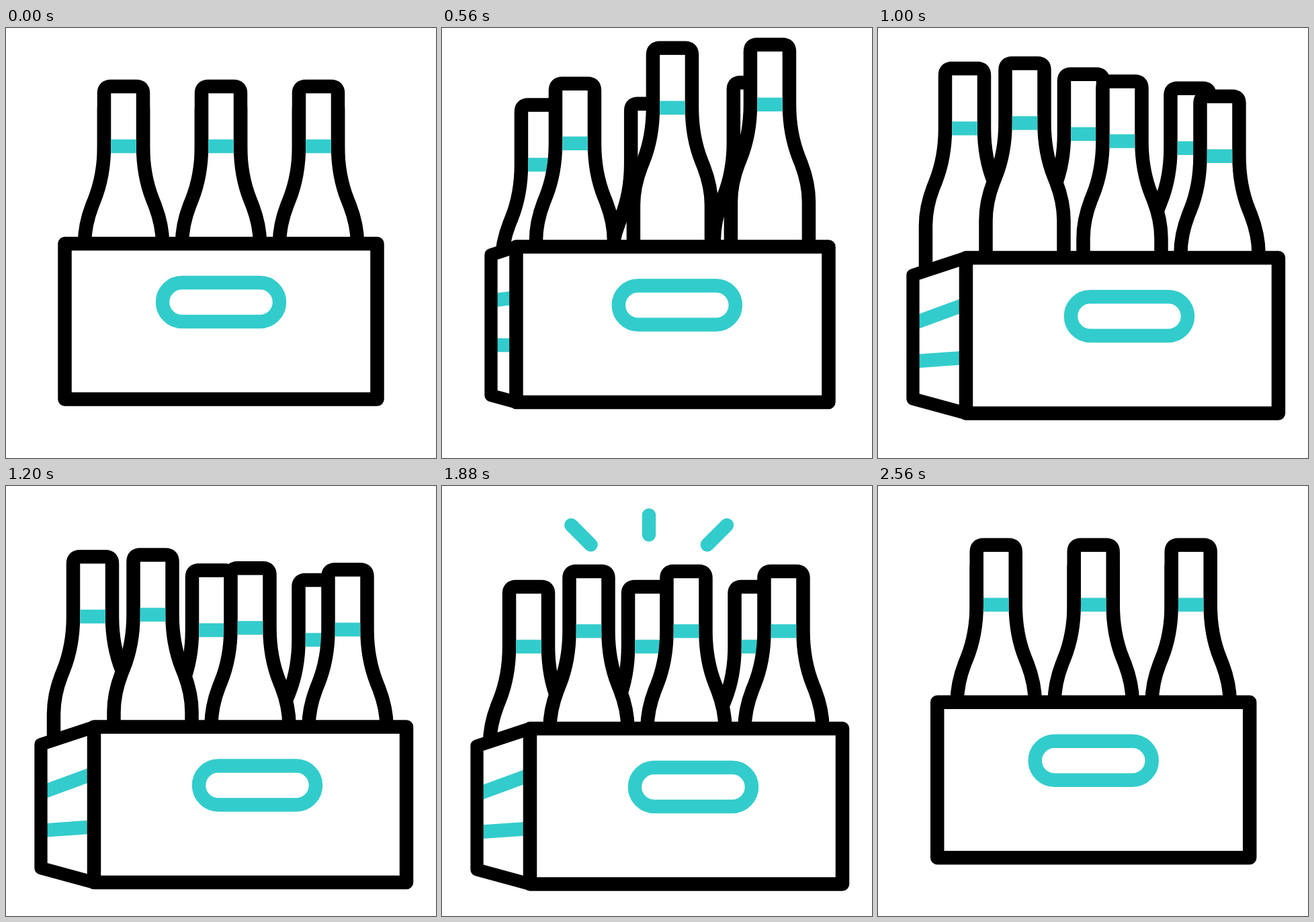
Animation of 640x640 px, one loop 2.6 s. Source, as an HTML page with a canvas:

```html
<!DOCTYPE html>
<html lang="en">
<head>
<meta charset="utf-8">
<title>Bottle crate</title>
<style>
  html, body { margin: 0; width: 100%; height: 100%; overflow: hidden; background: #fff; }
  canvas { display: block; width: 100vmin; height: 100vmin; }
</style>
</head>
<body>
<canvas width="640" height="640"></canvas>
<script>
const canvas = document.querySelector('canvas');
const ctx = canvas.getContext('2d');
const LOOP = 2600, LINE = 20.5;
const BLACK = '#000', TEAL = '#33cccc', WHITE = '#fff';
const BACK_START = 1872;

// Columns from left to right; lift = [start, peak, end] in ms.
const frontBottles = [
  { x: 175, lift: [480, 842, 1422] },
  { x: 320, lift: [103, 667, 1270] },
  { x: 465, lift: [100, 508, 1115] }
];
const backBottles = [
  { x: 175, shift: -89.5, lift: [690, 954, 1514], home: 2504 },
  { x: 320, shift: -57.5, lift: [528, 885, 1385], home: 2321 },
  { x: 465, shift: -44, lift: [400, 740, 1318], home: 2230 }
];
// Outer end first, inner end second.
const rays = [
  [192.3, 58.3, 221.5, 87.5],
  [308, 43.5, 308, 72.5],
  [424, 58.3, 394.8, 87.5]
];

const mix = (a, b, k) => a + (b - a) * k;
const progress = (t, a, b) => Math.min(1, Math.max(0, (t - a) / (b - a)));
const rise = s => s * s * (3 - 2 * s);
const smooth = (t, a, b) => rise(progress(t, a, b));

// Cubic bezier easing (1/3, 0, 1/3, 1), solved by bisection.
function glide(t, a, b) {
  const u = progress(t, a, b);
  let lo = 0, hi = 1;
  for (let i = 0; i < 24; i++) {
    const s = (lo + hi) / 2, r = 1 - s;
    if (r * r * s + r * s * s + s * s * s < u) lo = s; else hi = s;
  }
  return rise((lo + hi) / 2);
}

const homeward = (t, end) => 1 - smooth(t, BACK_START, end);
const hop = (t, [start, peak, end], height) =>
  height * (smooth(t, start, peak) - smooth(t, peak, end));

function stroke(color, width = LINE, cap = 'butt') {
  ctx.strokeStyle = color;
  ctx.lineWidth = width;
  ctx.lineCap = cap;
  ctx.lineJoin = 'round';
  ctx.stroke();
}

function line(x1, y1, x2, y2, color, cap) {
  ctx.beginPath();
  ctx.moveTo(x1, y1);
  ctx.lineTo(x2, y2);
  stroke(color, LINE, cap);
}

function bottle(x, y) {
  ctx.save();
  ctx.translate(x, y);
  ctx.beginPath();
  ctx.moveTo(-58, 300);
  ctx.lineTo(-58, 234);
  ctx.bezierCurveTo(-58, 214, -54, 196, -46.7, 177);
  ctx.lineTo(-43.5, 169);
  ctx.bezierCurveTo(-33.5, 144, -29, 117, -29, 89);
  ctx.lineTo(-29, 10);
  ctx.quadraticCurveTo(-29, 0, -19, 0);
  ctx.lineTo(19, 0);
  ctx.quadraticCurveTo(29, 0, 29, 10);
  ctx.lineTo(29, 89);
  ctx.bezierCurveTo(29, 117, 33.5, 144, 43.5, 169);
  ctx.lineTo(46.7, 177);
  ctx.bezierCurveTo(54, 196, 58, 214, 58, 234);
  ctx.lineTo(58, 300);
  ctx.fillStyle = WHITE;
  ctx.fill();
  stroke(BLACK);
  ctx.fillStyle = TEAL;
  ctx.fillRect(-18.8, 78.8, 37.6, LINE);
  ctx.restore();
}

function crateSide(x, y, open) {
  if (open < 0.002) return;
  const left = x - 79 * open;
  const panel = new Path2D();
  panel.moveTo(x, y);
  panel.lineTo(left, y + 26 * open);
  panel.lineTo(left, y + 231.5 - 21.5 * open);
  panel.lineTo(x, y + 231.5);
  panel.closePath();
  ctx.fillStyle = WHITE;
  ctx.fill(panel);
  line(left, y + mix(64.4, 98, open), x, y + mix(81.8, 69, open), TEAL);
  line(left, y + mix(139, 154.3, open), x, y + mix(145, 148.7, open), TEAL);
  ctx.strokeStyle = BLACK;
  ctx.lineWidth = 19.3;
  ctx.lineJoin = 'round';
  ctx.stroke(panel);
}

function crateFront(x, y, handleShift) {
  ctx.beginPath();
  ctx.rect(x, y, 465, 231.5);
  ctx.fillStyle = WHITE;
  ctx.fill();
  stroke(BLACK);
  const mid = x + 232.5 + handleShift;
  ctx.beginPath();
  ctx.arc(mid - 58, y + 87, 29, Math.PI / 2, Math.PI * 1.5);
  ctx.arc(mid + 58, y + 87, 29, -Math.PI / 2, Math.PI / 2);
  ctx.closePath();
  stroke(TEAL);
}

function drawRays(t) {
  const grown = smooth(t, 1280, 1690), left = homeward(t, 2330);
  if (grown <= 0.001 || left <= 0.001) return;
  for (const [ox, oy, ix, iy] of rays) {
    const far = 1 - grown;
    line(mix(ox, ix, far), mix(oy, iy, far), mix(ox, ix, left), mix(oy, iy, left), TEAL, 'round');
  }
}

function draw(t) {
  ctx.fillStyle = WHITE;
  ctx.fillRect(0, 0, 640, 640);

  const back = homeward(t, 2618);
  const dx = 43.5 * glide(t, 270, 1018) * back;
  const dy = (4.4 * smooth(t, 268, 440) + 35.6 * smooth(t, 740, 1288)) * back;
  const open = glide(t, 340, 950) * homeward(t, 2504);
  const handleShift = 10.5 * glide(t, 217, 965) * homeward(t, 2315);

  for (const b of backBottles) {
    const spread = smooth(t, 345, 740) * homeward(t, b.home);
    bottle(b.x + dx + b.shift * spread, 110 + dy - hop(t, b.lift, 72));
  }
  for (const b of frontBottles) {
    bottle(b.x + dx, 87 + dy - hop(t, b.lift, 68));
  }
  crateSide(87.5 + dx, 321 + dy, open);
  crateFront(87.5 + dx, 321 + dy, handleShift);
  drawRays(t);
}

function tick() {
  draw(performance.now() % LOOP);
  requestAnimationFrame(tick);
}
tick();
</script>
</body>
</html>
```
